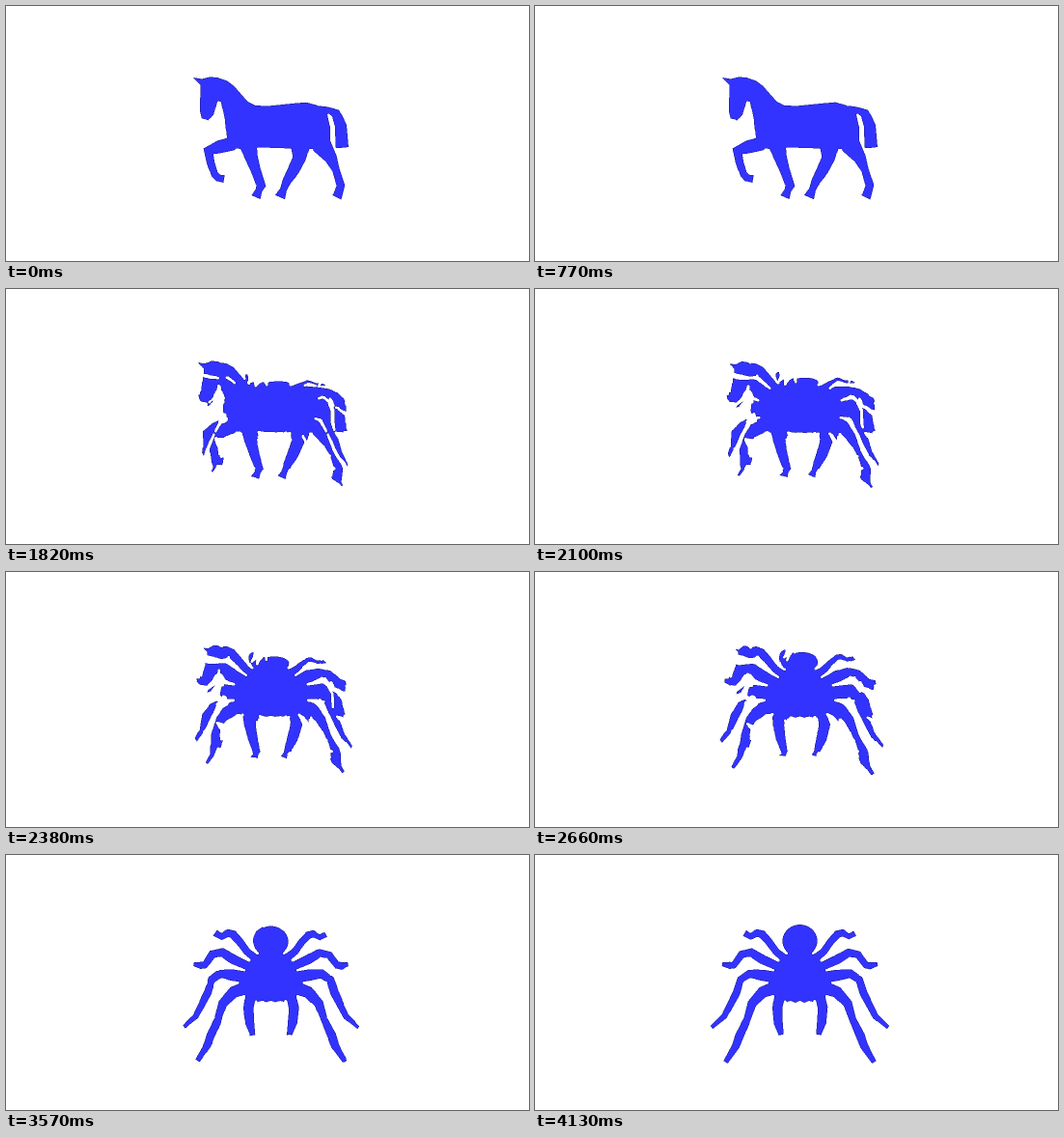
An HTML page with a canvas that plays this animation: 542x264 px, repeating every 4.83 s.

```html
<!DOCTYPE html>
<html lang="en">
<head>
<meta charset="utf-8">
<title>Horse to spider</title>
<style>
html, body { margin: 0; width: 100%; height: 100%; overflow: hidden; background: #fff; }
canvas { display: block; }
</style>
</head>
<body>
<canvas id="stage" width="542" height="264"></canvas>
<script>
const STEP = 70, STEPS = 50, HOLD = 700, LOOP = 4830;
const X0 = 176, Y0 = 66, OUT_W = 200, OUT_H = 156;
const SCALE = 2, W = OUT_W * SCALE, H = OUT_H * SCALE;
const FILL = [51, 51, 255], EDGE = [20, 20, 130], PAPER = [255, 255, 255];
const AXIS = 274.5;

// "x y, x y" or "x y w, x y w" to arrays of numbers
const parse = text => text.split(',').map(p => p.trim().split(' ').map(Number));

// Outline of a bent bar that follows key points, each with its own width.
function limb(text) {
  const pts = parse(text), left = [], right = [];
  const normal = (a, b) => {
    const dx = b[0] - a[0], dy = b[1] - a[1], d = Math.hypot(dx, dy);
    return [-dy / d, dx / d];
  };
  pts.forEach((p, i) => {
    const n = normal(pts[Math.max(i - 1, 0)], pts[Math.max(i, 1)]);
    const m = i > 0 && i < pts.length - 1 ? normal(p, pts[i + 1]) : n;
    const k = p[2] / 2 / (1 + n[0] * m[0] + n[1] * m[1]);
    const ox = (n[0] + m[0]) * k, oy = (n[1] + m[1]) * k;
    left.push([p[0] + ox, p[1] + oy]);
    right.unshift([p[0] - ox, p[1] - oy]);
  });
  return left.concat(right);
}

function ellipse(cx, cy, rx, ry, n = 40) {
  return Array.from({ length: n }, (_, i) => {
    const a = i / n * 2 * Math.PI;
    return [cx + rx * Math.cos(a), cy + ry * Math.sin(a)];
  });
}

const mirror = poly => poly.map(([x, y]) => [2 * AXIS - x, y]);

const trunk = parse(`194 74, 203 75.5, 211 73.5, 219 74, 228 77, 236 83, 250 99, 258 103,
  270 104, 299 101, 311 100, 322 103, 332 108, 335.5 124, 336 146, 318 148, 259 146,
  243 148, 231 146, 229 136, 227 118, 223 99, 219 98, 215 113, 209 118, 203 116, 201 108,
  201.5 82`);
const horseLimbs = [
  '323 104.5 2, 332 106.5 4, 341.5 111 9, 347 124 12, 348.5 146.5 13',       // tail
  '327 144 20, 337 158 12, 342 170 7, 347 186 8, 344 196 9, 343 198 10',     // hind legs
  '305 144 20, 304 158 13, 298 170 12, 291 181 9, 287.5 190 7, 284 198 11',
  '251 145 17, 254.5 157 13, 259 170 10, 264.5 186 9, 262 191 7, 259 198 10', // fore legs
  '236 142 14, 222 145.5 13, 210 150.5 9, 212 162 7.5, 216 174 7, 220 178 7, 226 179 8'
].map(limb);

const thorax = parse(`276 98, 264 100, 262 106, 252 111, 249 122, 246 134, 248 145, 258 145,
  261 152, 265 151, 270 153, 276 150`);
const spiderLimbs = [
  '260 108 8, 250 100 7, 242 89 7.5, 235.5 82 8, 230 80.5 7, 223.5 84.5 5, 217.5 81 6',
  '253 116 8, 235.5 108 9, 224 101 8, 214 103 7, 206 114 6, 202 114.5 7, 194 113 4',
  '251 127 11, 236 124.5 11, 222 123 8, 213 129 7, 208.5 143 7.5, 196 167 6, 183 178.5 4',
  '250 137 13, 236 142 11, 225 154 9, 220 170 7, 212 187 9, 208 198 8, 197.5 214.5 5',
  '254.5 143 10, 251 158 10, 252 174 9, 255 186 5'
].map(limb);

const HORSE = [trunk, ...horseLimbs];
const half = [thorax, ...spiderLimbs];
const SPIDER = [ellipse(AXIS, 89, 18, 17), ...half, ...half.map(mirror)];

const ctx = document.getElementById('stage').getContext('2d');
const image = ctx.createImageData(OUT_W, OUT_H);

function rasterize(polys) {
  const c = document.createElement('canvas');
  c.width = W;
  c.height = H;
  const g = c.getContext('2d');
  g.setTransform(SCALE, 0, 0, SCALE, -X0 * SCALE, -Y0 * SCALE);
  for (const poly of polys) {
    g.beginPath();
    for (const [x, y] of poly) g.lineTo(x, y);
    g.fill();
  }
  const data = g.getImageData(0, 0, W, H).data;
  return Uint8Array.from({ length: W * H }, (_, i) => data[i * 4 + 3] > 127 ? 1 : 0);
}

// Polygon sides in grid units: start and direction.
function sides(polys) {
  const toGrid = ([x, y]) => [(x - X0) * SCALE - 0.5, (y - Y0) * SCALE - 0.5];
  return polys.flatMap(poly => {
    const p = poly.map(toGrid);
    return p.map(([x, y], i) => {
      const [u, v] = p[(i + 1) % p.length];
      return { x, y, dx: u - x, dy: v - y };
    });
  });
}

function toNearest(x, y, edges) {
  let best = Infinity, bx = 0, by = 0;
  for (const e of edges) {
    const px = e.x - x, py = e.y - y;
    const t = -(px * e.dx + py * e.dy) / (e.dx * e.dx + e.dy * e.dy);
    const k = Math.min(1, Math.max(0, t));
    const u = px + k * e.dx, v = py + k * e.dy, d = u * u + v * v;
    if (d < best) { best = d; bx = u; by = v; }
  }
  return [bx, by];
}

// Each cell of one shape with its offset to the nearest point of the other.
function links(from, to, edges) {
  const list = [];
  from.forEach((on, i) => {
    if (!on) return;
    const x = i % W, y = Math.floor(i / W);
    list.push(x, y, ...(to[i] ? [0, 0] : toNearest(x, y, edges)));
  });
  return Float32Array.from(list);
}

const horse = rasterize(HORSE), spider = rasterize(SPIDER);
const forward = links(horse, spider, sides(SPIDER));
const backward = links(spider, horse, sides(HORSE));
const moved = new Uint8Array(W * H), grown = new Uint8Array(W * H), solid = new Uint8Array(W * H);

const disk = [];
for (let y = -2; y <= 2; y++) {
  for (let x = -2; x <= 2; x++) if (x * x + y * y <= 5) disk.push(y * W + x);
}

function plot(list, amount) {
  for (let k = 0; k < list.length; k += 4) {
    const x = Math.round(list[k] + list[k + 2] * amount);
    const y = Math.round(list[k + 1] + list[k + 3] * amount);
    moved[y * W + x] = 1;
  }
}

// Grow, then shrink: hairline gaps heal, wider ones stay open.
function heal() {
  grown.fill(0);
  solid.fill(1);
  moved.forEach((on, i) => { if (on) for (const d of disk) grown[i + d] = 1; });
  grown.forEach((on, i) => { if (!on) for (const d of disk) solid[i + d] = 0; });
}

function colour(i) {
  if (!solid[i]) return PAPER;
  return solid[i - 1] && solid[i + 1] && solid[i - W] && solid[i + W] ? FILL : EDGE;
}

function draw(amount) {
  moved.fill(0);
  plot(forward, amount);
  plot(backward, 1 - amount);
  heal();
  for (let y = 0; y < OUT_H; y++) {
    for (let x = 0; x < OUT_W; x++) {
      const i = y * SCALE * W + x * SCALE, o = (y * OUT_W + x) * 4;
      const cells = [i, i + 1, i + W, i + W + 1].map(colour);
      for (let c = 0; c < 3; c++) {
        image.data[o + c] = cells.reduce((sum, cell) => sum + cell[c], 0) / 4;
      }
      image.data[o + 3] = 255;
    }
  }
  ctx.putImageData(image, X0, Y0);
}

const ease = u => u < 0.5 ? 2 * u * u : 1 - 2 * (1 - u) * (1 - u);

function stepAt(t) {
  if (t < HOLD) return 0;
  return Math.min(STEPS, Math.floor((t - HOLD) / STEP) + 1);
}

let shown = -1;
function tick() {
  const step = stepAt((performance.now() - start) % LOOP);
  if (step !== shown) {
    shown = step;
    draw(ease(step / STEPS));
  }
  requestAnimationFrame(tick);
}

ctx.fillStyle = '#fff';
ctx.fillRect(0, 0, 542, 264);
const start = performance.now();
tick();
</script>
</body>
</html>
```
